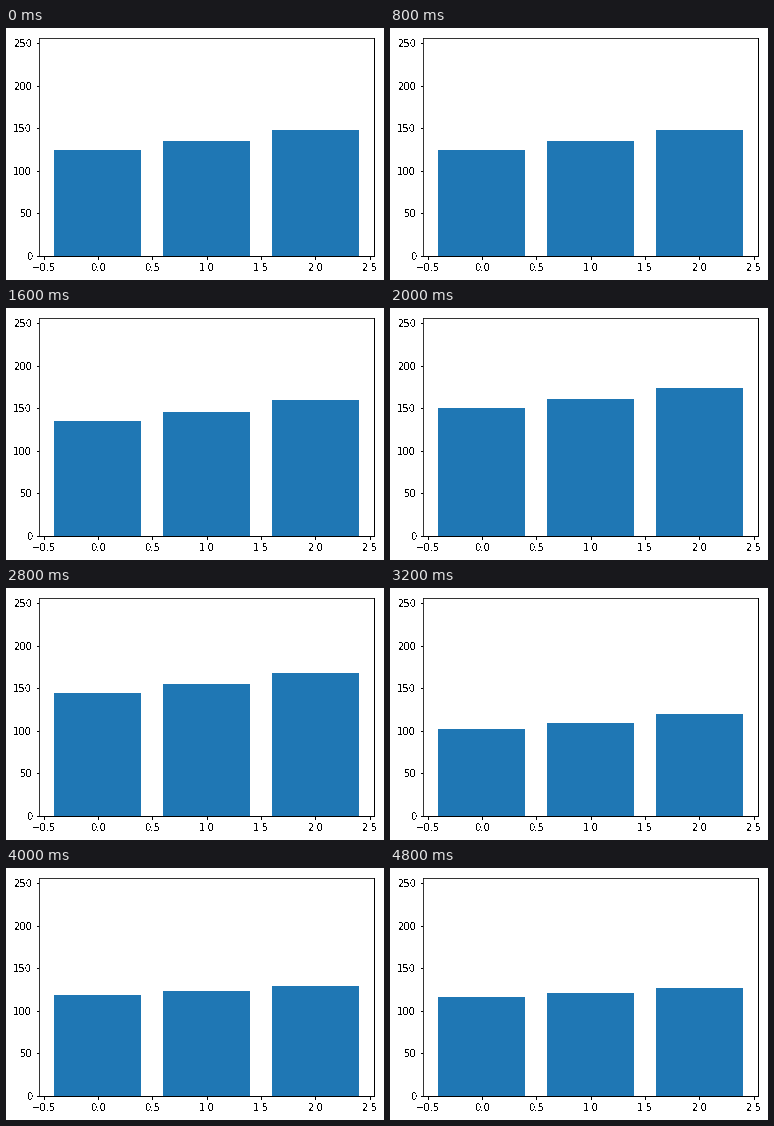
A matplotlib script that plays this animation: 378 by 252 pixels, repeating every 5200 ms.

```python
import matplotlib.pyplot as plt
import numpy as np
from matplotlib.animation import FuncAnimation

WIDTH, HEIGHT, DPI = 378, 252, 72
STEPS, STEP_MS = 13, 400

# Key points (step, level) of the first bar: hold, swell, drop, settle
KEYS = [(3, 124.4), (4, 135.4), (5, 150.3), (6, 144.5), (7, 144.5),
        (8, 102.1), (9, 119.5), (11, 118.6), (12, 116.2)]


def heights(step):
    """Three bars fanned out above a shared level; the fan narrows at the drop."""
    level = np.interp(step, *zip(*KEYS))
    spread = np.interp(step, [7, 9], [24, 10.6])
    return level + spread * np.array([0, 0.42, 1])


def harden(image, dpi):
    """Turn soft edges into solid black pixels."""
    solid = np.zeros_like(image)
    solid[..., 3] = image[..., 3] > 0.5
    return solid, 0, 0


fig = plt.figure(figsize=(WIDTH / DPI, HEIGHT / DPI), dpi=DPI, facecolor="white")

left, base = 33.2, 227.7  # axes corner in pixels from the top left
ax_w, ax_h = 334.8, 217.44
ax = fig.add_axes([left / WIDTH, 1 - base / HEIGHT, ax_w / WIDTH, ax_h / HEIGHT])

bars = ax.bar(range(3), heights(0), color="#1f77b4")
ax.set_xlim(-0.54, 2.54)
ax.set_ylim(0, 256)
ax.set_xticks(np.arange(-0.5, 2.6, 0.5))
ax.set_yticks(range(0, 251, 50))
ax.tick_params(labelsize=10, labelfontfamily="DejaVu Sans")

for part in (ax.xaxis, ax.yaxis, ax.spines["right"], ax.spines["bottom"]):
    part.set_agg_filter(harden)


def draw(step):
    for bar, height in zip(bars, heights(step)):
        bar.set_height(height)
    return bars.patches


anim = FuncAnimation(fig, draw, frames=STEPS, interval=STEP_MS,
                     repeat=True, repeat_delay=0, blit=False)

plt.show()
```
